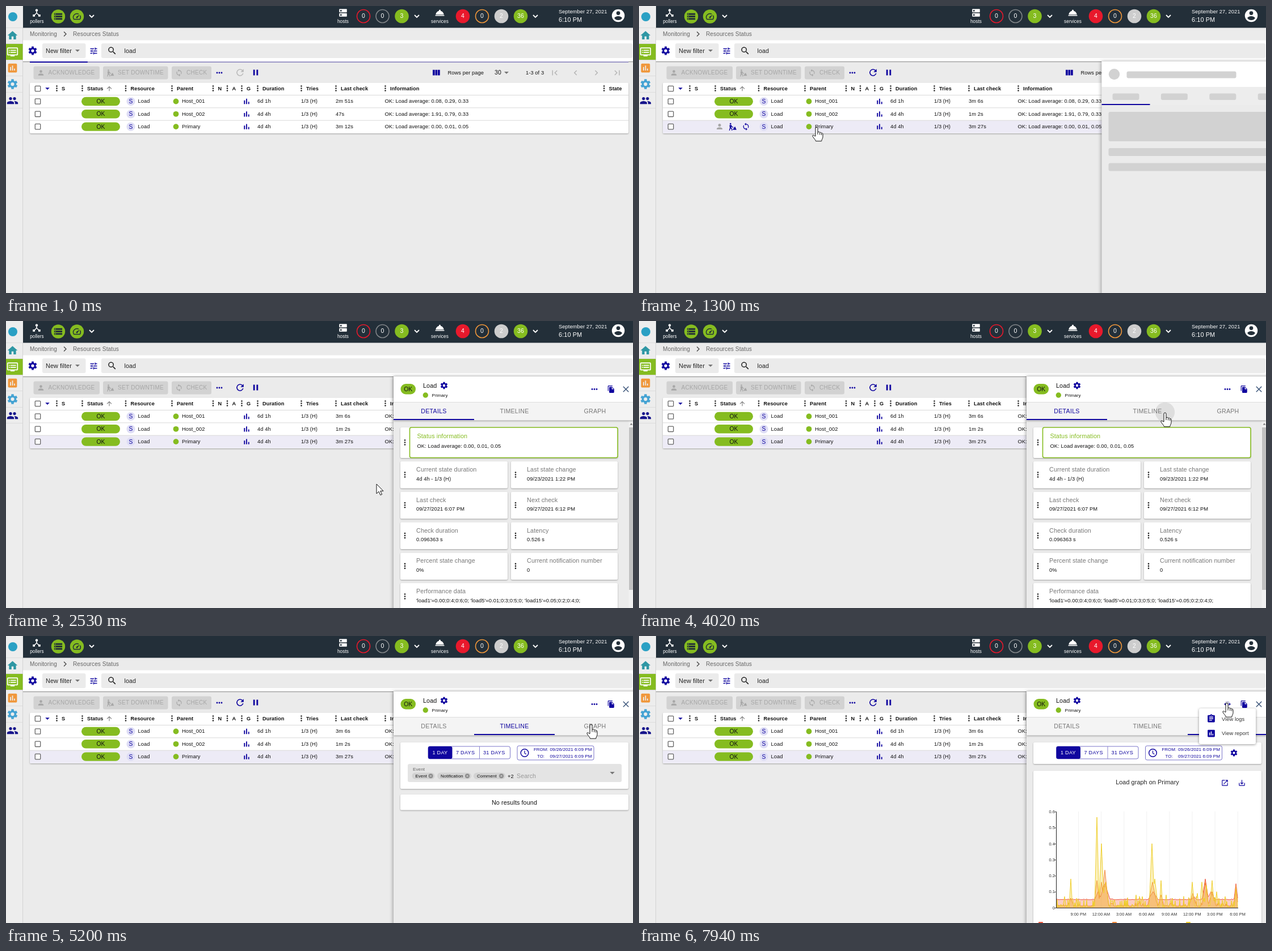
Write an HTML page that moves like this. It is 1105 by 507 pixels and loops after 8 s.

```html
<!DOCTYPE html>
<html lang="en">
<head>
<meta charset="utf-8">
<title>Resources Status</title>
<style>
html, body { margin: 0; width: 100%; height: 100%; overflow: hidden; background: #ebebeb; }
svg { display: block; width: 1105px; height: 507px; font-family: "Liberation Sans", Arial, sans-serif; }
text { letter-spacing: .008em; white-space: pre; }
.caps { letter-spacing: .028em; }
.card { fill: #fff; filter: drop-shadow(0 1px 1px rgba(0,0,0,.32)); }
</style>
</head>
<body>
<svg id="stage" viewBox="0 0 1105 507"></svg>
<script>
const NAVY = '#10069f', GREEN = '#85bc20', RED = '#e8192c', ORANGE = '#f0973b', DARK = '#232f39';
const PAGE = '#ebebeb', MUTED = '#a7a7a7', BONE = '#d2d2d2';
const HOST = 'Primary';

const ICONS = {
  hub: 'M17 16l-4-4V8.82C14.16 8.4 15 7.3 15 6c0-1.66-1.34-3-3-3S9 4.34 9 6c0 1.3.84 2.4 2 2.82V12l-4 4H3v5h5v-3.05l4-4.2 4 4.2V21h5v-5z',
  storage: 'M2 20h20v-4H2zm2-3h2v2H4zM2 4v4h20V4zm4 3H4V5h2zm-4 7h20v-4H2zm2-3h2v2H4z',
  speed: 'M20.38 8.57l-1.23 1.85a8 8 0 0 1-.22 7.58H5.07A8 8 0 0 1 15.58 6.85l1.85-1.23A10 10 0 0 0 3.35 19a2 2 0 0 0 1.72 1h13.85a2 2 0 0 0 1.74-1 10 10 0 0 0-.27-10.44zm-9.79 6.84a2 2 0 0 0 2.83 0l5.66-8.49-8.49 5.66a2 2 0 0 0 0 2.83z',
  dns: 'M4 13h16a1 1 0 0 1 1 1v6a1 1 0 0 1-1 1H4a1 1 0 0 1-1-1v-6a1 1 0 0 1 1-1zm3 2a2 2 0 0 0 0 4 2 2 0 0 0 0-4zM4 3h16a1 1 0 0 1 1 1v6a1 1 0 0 1-1 1H4a1 1 0 0 1-1-1V4a1 1 0 0 1 1-1zm3 2a2 2 0 0 0 0 4 2 2 0 0 0 0-4z',
  bell: 'M2 17h20v2H2zm11.84-9.21a2 2 0 1 0-3.68 0C6.25 8.6 3.27 11.93 3 16h18c-.27-4.07-3.25-7.4-7.16-8.21z',
  account: 'M12 2a10 10 0 0 0 0 20 10 10 0 0 0 0-20zm0 3a3 3 0 0 1 0 6 3 3 0 0 1 0-6zm0 14.2c-2.5 0-4.71-1.28-6-3.22.03-1.99 4-3.08 6-3.08s5.97 1.09 6 3.08c-1.29 1.94-3.5 3.22-6 3.22z',
  home: 'M10 20v-6h4v6h5v-8h3L12 3 2 12h3v8z',
  dvr: 'M21 3H3a2 2 0 0 0-2 2v12a2 2 0 0 0 2 2h5v2h8v-2h5a2 2 0 0 0 2-2V5a2 2 0 0 0-2-2zm0 14H3V5h18zM19 8H8v2h11zm0 4H8v2h11zM7 8H5v2h2zm0 4H5v2h2z',
  report: 'M19 3H5a2 2 0 0 0-2 2v14a2 2 0 0 0 2 2h14a2 2 0 0 0 2-2V5a2 2 0 0 0-2-2zM9 17H7v-7h2zm4 0h-2V7h2zm4 0h-2v-4h2z',
  people: 'M16 11a3 3 0 1 0 0-6 3 3 0 0 0 0 6zm-8 0a3 3 0 1 0 0-6 3 3 0 0 0 0 6zm0 2c-2.33 0-7 1.17-7 3.5V19h14v-2.5C15 14.17 10.33 13 8 13zm8 0l-.97.05c1.16.84 1.97 1.97 1.97 3.45V19h6v-2.5c0-2.33-4.67-3.5-7-3.5z',
  tune: 'M3 17v2h6v-2zM3 5v2h10V5zm10 16v-2h8v-2h-8v-2h-2v6zM7 9v2H3v2h4v2h2V9zm14 4v-2H11v2zm-6-4h2V7h4V5h-4V3h-2z',
  search: 'M15.5 14h-.8l-.27-.27A6.5 6.5 0 1 0 13.73 14.43l.27.28v.79l5 5L20.5 19zm-6 0a4.5 4.5 0 1 1 0-9 4.5 4.5 0 0 1 0 9z',
  person: 'M12 12a4 4 0 1 0 0-8 4 4 0 0 0 0 8zm0 2c-2.67 0-8 1.34-8 4v2h16v-2c0-2.66-5.33-4-8-4z',
  worker: 'M6 2a2 2 0 0 1 0 4.4A2 2 0 0 1 6 2zM3 8l5-1 3 5 3 1v2l-4-1-2-2v3l3 3v5H9v-4l-3-2-2 6H2l2-8zM12 21l4.500-7L19 12l4 9z',
  sync: 'M12 4V1L8 5l4 4V6a6 6 0 0 1 5.3 8.8l1.46 1.46A8 8 0 0 0 12 4zm0 14a6 6 0 0 1-5.3-8.8L5.24 7.74A8 8 0 0 0 12 20v3l4-4-4-4z',
  refresh: 'M17.65 6.35A8 8 0 1 0 19.73 14h-2.08A6 6 0 1 1 16.22 7.78L13 11h7V4z',
  pause: 'M6 19h4V5H6zm8-14v14h4V5z',
  columns: 'M10 18h5V5h-5zm-6 0h5V5H4zM16 5v13h5V5z',
  first: 'M18.4 16.6L13.8 12l4.600-4.600L17 6l-6 6 6 6zM6 6h2v12H6z',
  left: 'M15.400 7.400L14 6l-6 6 6 6 1.400-1.400L10.800 12z',
  right: 'M8.600 7.400L10 6l6 6-6 6-1.400-1.400L13.200 12z',
  last: 'M5.600 7.400L10.200 12l-4.600 4.600L7 18l6-6-6-6zM16 6h2v12h-2z',
  bars: 'M5 9.2h3V19H5zM10.600 5h2.800v14h-2.800zm5.600 8H19v6h-2.800z',
  up: 'M4 12l1.400 1.400L11 7.800V20h2V7.800l5.600 5.600L20 12l-8-8z',
  drop: 'M6 9l6 6 6-6z',
  close: 'M19 6.400L17.600 5 12 10.600 6.400 5 5 6.400l5.600 5.600L5 17.600 6.400 19l5.600-5.600 5.600 5.600 1.400-1.400-5.600-5.600z',
  copy: 'M16 1H4a2 2 0 0 0-2 2v14h2V3h12zm-1 4l6 6v10a2 2 0 0 1-2 2H8a2 2 0 0 1-2-2V7a2 2 0 0 1 2-2zm-1 7h5.500L14 6.500z',
  open: 'M19 19H5V5h7V3H5a2 2 0 0 0-2 2v14a2 2 0 0 0 2 2h14a2 2 0 0 0 2-2v-7h-2zM14 3v2h3.600l-9.800 9.800 1.400 1.400L19 6.400V10h2V3z',
  save: 'M19 12v7H5v-7H3v7a2 2 0 0 0 2 2h14a2 2 0 0 0 2-2v-7zm-6 .7l2.600-2.600L17 11.500l-5 5-5-5 1.400-1.400 2.600 2.600V3h2z',
  logs: 'M19 3h-4.200a3 3 0 0 0-5.600 0H5a2 2 0 0 0-2 2v14a2 2 0 0 0 2 2h14a2 2 0 0 0 2-2V5a2 2 0 0 0-2-2zm-7 0a1 1 0 0 1 0 2 1 1 0 0 1 0-2zm2 14H7v-2h7zm3-4H7v-2h10zm0-4H7V7h10z'
};

const text = (x, y, s, size = 9.3, fill = '#111', extra = '') =>
  `<text x="${x}" y="${y}" font-size="${size}" fill="${fill}" ${extra}>${s}</text>`;
const middle = (x, y, s, size, fill, extra = '') => text(x, y, s, size, fill, 'text-anchor="middle" ' + extra);
const rect = (x, y, w, h, fill, r = 0, extra = '') =>
  `<rect x="${x}" y="${y}" width="${w}" height="${h}" fill="${fill}" rx="${r}" ${extra}/>`;
const card = (x, y, w, h) => rect(x, y, w, h, '#fff', 2, 'class="card"');
const circle = (x, y, r, fill, extra = '') => `<circle cx="${x}" cy="${y}" r="${r}" fill="${fill}" ${extra}/>`;
const path = (d, extra) => `<path d="${d}" ${extra}/>`;
const group = (id, ...parts) => `<g id="${id}">${parts.join('')}</g>`;
const icon = (name, x, y, size, fill, extra = '') =>
  path(ICONS[name], `transform="translate(${x - size / 2} ${y - size / 2}) scale(${size / 24})" fill="${fill}" fill-rule="evenodd" ${extra}`);
const gear = (x, y, r, color) => {
  const teeth = [0, 60, 120].map(a => path('M0-10V-5M0 5V10', `stroke-width="5" transform="rotate(${a})"`)).join('');
  return `<g transform="translate(${x} ${y}) scale(${r / 10})" stroke="${color}" fill="none"><circle r="5.500" stroke-width="4"/>${teeth}</g>`;
};
const chevron = (x, y) => path(`M${x - 4} ${y - 2}l4 4 4-4`, 'fill="none" stroke="#fff" stroke-width="1.800"');
const grip = (x, y) => [-4, 0, 4].map(d => circle(x, y + d, 1.3, '#222')).join('');
const more = (x, y, color) => [-4, 0, 4].map(d => circle(x + d, y, 1.4, color)).join('');
const box = (x, y) => rect(x - 4.7, y - 4.7, 9.4, 9.4, '#fff', 1, 'stroke="#666" stroke-width="1.300"');

function topBar() {
  const badge = (x, s, color, filled) => circle(x, 18, filled ? 12.3 : 11.5, filled ? color : 'none',
    `stroke="${color}" stroke-width="${filled ? 0 : 1.600}"`) + middle(x, 21, s, 10.5, '#fff');
  return rect(30, 0, 1075, 38.5, DARK) +
    icon('hub', 54, 12, 18, '#fff') + middle(54.5, 30, 'pollers', 8.2, '#fff') +
    [92, 125].map((x, i) => circle(x, 18.5, 12.2, GREEN) + icon(['storage', 'speed'][i], x, 18.5, 17, DARK)).join('') +
    icon('dns', 594, 12, 18, '#fff') + middle(594, 30, 'hosts', 8.3, '#fff') +
    badge(630, 0, RED) + badge(663.5, 0, '#818589') + badge(697.5, 3, GREEN, true) +
    icon('bell', 764.5, 12, 19, '#fff') + middle(764.5, 30, 'services', 8.3, '#fff') +
    badge(805, 4, RED, true) + badge(839, 0, ORANGE) + badge(873, 2, '#cdcdcd', true) + badge(907, 36, GREEN, true) +
    [151, 724, 933].map(x => chevron(x, 18)).join('') +
    text(974, 13, 'September 27, 2021', 9.3, '#fff') + text(974, 28, '6:10 PM', 10.9, '#fff') +
    icon('account', 1079, 17, 27, '#fff');
}

function sideBar() {
  return rect(0, 0, 30, 507, '#ededed') + rect(29, 38, 1, 469, '#d3d3d3') +
    [38, 66, 95, 123, 152, 180].map(y => rect(0, y, 29, 1, '#dcdcdc')).join('') +
    circle(12, 19, 8, '#2aa0c4') + rect(0, 67, 29.5, 28, GREEN) +
    icon('home', 11.5, 52, 21, '#2e97a4') + icon('dvr', 11.5, 81, 21, '#fff') +
    icon('report', 11.5, 109.5, 21, ORANGE) + gear(11.5, 138, 8.8, '#45a3d3') + icon('people', 11.5, 167, 21, '#16148c');
}

function filters() {
  const button = (x, w, name, label) => rect(x, 106.5, w, 23, BONE, 3) + icon(name, x + 13, 118, 14, MUTED) +
    text(x + 26, 121.3, label, 10, MUTED, 'class="caps"');
  return text(42, 53, 'Monitoring', 10.1, '#666') + path('M102 45.500l4 4-4 4', 'fill="none" stroke="#444" stroke-width="1.300"') +
    text(118, 53, 'Resources Status', 10.1, '#666') +
    rect(30, 60.5, 1075, 38, '#fff') + rect(30, 98, 1075, 1, '#868686') +
    gear(47, 79, 7.5, NAVY) + rect(64, 66, 76.5, 26, PAGE, 3) + text(70, 82.5, 'New filter', 10.8, '#222') +
    icon('drop', 126, 79, 16, '#777') + icon('tune', 154.5, 79.5, 16, NAVY) +
    rect(168, 66, 936, 26, PAGE, 3) + icon('search', 187, 79, 18, '#222') + text(208.5, 82.5, 'load', 10.7, '#222') +
    button(48.5, 116.5, 'person', 'ACKNOWLEDGE') + button(171, 114.5, 'worker', 'SET DOWNTIME') + button(292, 70, 'sync', 'CHECK') +
    more(376, 118, NAVY) + icon('refresh', 412.5, 117.5, 19, '#bbb', 'id="refresh"') + icon('pause', 440, 117.5, 17, NAVY) +
    icon('columns', 758, 118, 18, NAVY) + text(778.5, 120.5, 'Rows per page') + text(861, 121.3, '30', 10.5) +
    icon('drop', 882, 118, 16, '#777') + text(916, 120.5, '1-3 of 3') +
    ['first', 'left', 'right', 'last'].map((n, i) => icon(n, 967 + i * 36.7, 118, 18, '#b5b5b5')).join('');
}

function table() {
  const heads = { S: 98, Status: 143, Resource: 219.5, Parent: 301, N: 373.5, A: 398.5, G: 424, Duration: 452,
    Tries: 529, 'Last check': 590, Information: 677, State: 1062.5 };
  const rows = [['Host_001', '6d 1h', '0.08, 0.29, 0.33'], ['Host_002', '4d 4h', '1.91, 0.79, 0.33'], [HOST, '4d 4h', '0.00, 0.01, 0.05']];
  const header = box(56, 146) + icon('drop', 73, 146, 15, NAVY) + icon('up', 182, 146, 13, '#777') +
    Object.entries(heads).map(([s, x]) => grip(x - 8.5, 145.5) + text(x, 148.7, s, 9.2, '#111', 'font-weight="700"')).join('');
  const body = rows.map(([name, age, load], i) => {
    const y = 168.5 + i * 22.3, base = y + 2.8;
    const pill = rect(133, y - 7.7, 68, 15.4, GREEN, 7.7) + middle(167, y + 3.6, 'OK', 10.3, '#111');
    return (i == 2 ? rect(42, y - 11, 1055, 22.5, '#edebf6', 0, 'id="selected"') : '') +
      rect(42, y - 11.5, 1055, 1, '#d9d9d9') + box(56, y) + group('pill' + i, pill) +
      circle(220, y, 7.6, '#dfdef5') + middle(220, y + 3.6, 'S', 10.3, NAVY) + text(232.5, base, 'Load') +
      circle(299.5, y, 4.9, GREEN) + text(310, base, name) + icon('bars', 424, y, 16, NAVY) + text(443, base, age) +
      text(520, base, '1/3 (H)') + text(581, base, '', 9.3, '#111', `id="check${i}"`) + text(667.5, base, 'OK: Load average: ' + load);
  }).join('');
  return card(42, 135.5, 1055, 89.5) + header + body +
    group('rowTools', icon('person', 142, 213, 15, MUTED), icon('worker', 165, 213, 15, NAVY), icon('sync', 188.5, 213, 15, NAVY));
}

function skeleton() {
  const bone = (x, y, w, h) => rect(x, y, w, h, BONE, 3);
  return group('skeleton', rect(683, 98, 422, 45, '#fff'), circle(705, 120.5, 9.7, BONE), bone(727, 115.5, 193, 12),
    rect(683, 143.5, 422, 31.5, '#ededed'), [0, 1, 2, 3, 4].map(i => bone(702 + i * 85.4, 154.5, 47, 11.5)).join(''),
    rect(683, 173, 85, 2, NAVY), bone(695, 187, 402, 52), bone(695, 251, 402, 14), bone(695, 277.5, 402, 14));
}

function details() {
  const tile = (x, y, w, title, value) => card(x, y, w, 47.5) + grip(x + 8, y + 23.5) +
    text(x + 28, y + 18, title, 10.8, '#777') + text(x + 28, y + 33.5, value);
  const pairs = [['Current state duration', '4d 4h - 1/3 (H)', 'Last state change', '09/23/2021 1:22 PM'],
    ['Last check', '09/27/2021 6:07 PM', 'Next check', '09/27/2021 6:12 PM'],
    ['Check duration', '0.096363 s', 'Latency', '0.526 s'], ['Percent state change', '0%', 'Current notification number', '0']];
  return group('details', card(695, 188, 383, 54), grip(703, 214.5),
    rect(711.5, 188, 366.5, 53.5, '#fff', 3, `stroke="${GREEN}" stroke-width="1.600"`),
    text(724.5, 206.5, 'Status information', 10.8, GREEN), text(724.5, 224, 'OK: Load average: 0.00, 0.01, 0.05'),
    pairs.map(([a, b, c, d], i) => tile(695, 248 + i * 53.8, 189, a, b) + tile(890, 248 + i * 53.8, 188, c, d)).join(''),
    tile(695, 463, 383, 'Performance data', "'load1'=0.00;0:4;0:6;0; 'load5'=0.01;0:3;0:5;0; 'load15'=0.05;0:2;0:4;0;"),
    rect(1097.5, 176, 7.5, 331, '#f1f1f1'), rect(1098, 188, 7, 287, '#c1c1c1'), path('M1099.500 183.500l2.500-3 2.500 3z', 'fill="#777"'));
}

function period(dx) {
  const label = (x, s, fill) => text(x + dx, 209, s, 9.1, fill, 'class="caps"');
  return rect(744 + dx, 195, 144.5, 22, '#fff', 3, `stroke="${NAVY}" stroke-opacity=".55"`) + rect(744 + dx, 195, 42.5, 22, NAVY, 3) +
    rect(834 + dx, 195, 1, 22, '#8d88cf') + label(751.5, '1 DAY', '#fff') + label(793, '7 DAYS', NAVY) + label(841, '31 DAYS', NAVY) +
    rect(901 + dx, 194, 135, 25, '#fff', 3, `stroke="${NAVY}" stroke-opacity=".55"`) +
    circle(914 + dx, 206.5, 6.8, 'none', 'stroke="#10069f" stroke-width="1.500"') +
    path(`M${914 + dx} 202.500v4.500l3 2`, 'fill="none" stroke="#10069f" stroke-width="1.200"') +
    text(930 + dx, 203, 'FROM:', 7.8, NAVY) + text(958.5 + dx, 203, '09/26/2021 6:09 PM', 8.1, NAVY) +
    text(936 + dx, 215, 'TO:', 7.8, NAVY) + text(958.5 + dx, 215, '09/27/2021 6:09 PM', 8.1, NAVY);
}

function timeline() {
  const chip = (x, w, s) => rect(x, 241.5, w, 11.5, '#d2d2d2', 5.7) + text(x + 6, 250, s, 7.9) +
    circle(x + w - 7, 247.3, 4, '#8c8c8c') + path(`M${x + w - 8.5} 245.800l3 3m0-3l-3 3`, 'stroke="#ddd"');
  return group('timeline', card(695, 188, 402, 82), period(0), rect(708, 226, 377, 32, '#e4e4e4', 3),
    text(717, 238, 'Event', 8.1, '#666'), chip(715.5, 40, 'Event'), chip(760, 60, 'Notification'), chip(824, 56, 'Comment'),
    text(884, 250.5, '+2', 9.4), text(900, 251, 'Search', 10.6, '#999'), icon('drop', 1068.5, 242, 17, '#777'),
    group('noResults', card(695, 280, 402, 27.5), middle(896, 297.5, 'No results found', 10.8, '#111')),
    group('waiting', [280, 341, 402].map(y => rect(695, y, 402, 55, BONE, 3)).join('')));
}

// Each series is a floor with triangular peaks: [x, value, half width].
function series(floor, peaks, ripple, color) {
  let seed = 7, d = 'M736 480';
  const random = () => (seed = seed * 16807 % 2147483647) / 2147483647;
  for (let x = 736; x <= 1055; x++) {
    const noise = ripple * Math.pow(random(), 5);
    const v = Math.max(floor + noise, ...peaks.map(([px, h, w]) => h * (1 - Math.abs(x - px) / w)));
    d += `L${x} ${(480 - v * 283).toFixed(1)}`;
  }
  return path(d + 'V480z', `fill="${color}" fill-opacity=".3"`) + path(d, `fill="none" stroke="${color}" stroke-width="1"`);
}

function graph() {
  const hours = ['9:00 PM', '12:00 AM', '3:00 AM', '6:00 AM', '9:00 AM', '12:00 PM', '3:00 PM', '6:00 PM'];
  const red = [[809, .1, 12], [821, .15, 14], [906, .1, 18], [978, .07, 16], [998, .18, 8], [1008, .1, 14], [1052, .15, 5]];
  const orange = [[761, .06, 6], [807, .17, 6], [815, .16, 6], [821, .235, 7], [905, .16, 9], [920, .08, 6], [976, .09, 7],
    [998, .16, 6], [1010, .1, 8], [1052, .14, 4]];
  const yellow = [[750, .07, 3], [761, .18, 3], [771, .06, 2], [807, .565, 4], [815, .4, 5], [822, .16, 7], [838, .05, 3],
    [876, .08, 3], [887, .07, 4], [904, .4, 5], [909, .18, 6], [920, .17, 3], [929, .08, 3], [975, .16, 4], [984, .09, 3],
    [992, .16, 4], [1000, .14, 4], [1010, .17, 4], [1018, .1, 3], [1033, .07, 3], [1052, .12, 3]];
  return group('graph', card(695, 188, 402, 38), period(-8.5), gear(1048.5, 206.5, 6, NAVY), card(695, 238, 402, 280),
    group('chart', middle(896, 262, 'Load graph on ' + HOST, 10.8, '#222'), icon('open', 1032.5, 259.5, 14, NAVY), icon('save', 1062.5, 259.5, 14, NAVY),
      hours.map((s, i) => rect(774 + i * 40.1, 310, 1, 170, '#f1f1f1') + middle(774.3 + i * 40.1, 494, s, 7.3, '#333')).join(''),
      series(.05, red, .008, '#ee5a42'), series(.01, orange, .03, '#f3893a'), series(.003, yellow, .07, '#f0d02e'),
      path('M735.500 310V480.500H1056', 'fill="none" stroke="#222"'),
      [0, 1, 2, 3, 4, 5, 6].map(i => rect(732, 480 - i * 28.3, 4, 1, '#555') +
        text(733, 482.7 - i * 28.3, i ? '0.' + i : '0', 7.5, '#333', 'text-anchor="end"')).join(''),
      ['#ee5a42', '#f3893a', '#f0d02e'].map((c, i) => rect(704 + i * 130, 505, 8, 4, c, 1)).join('')));
}

function panel() {
  const tab = (i, s) => middle(754 + i * 142, 163.3, s, 10.6, '#777', `id="tab${i}" class="caps"`);
  const loaded = group('loaded', details(), timeline(), graph(),
    rect(683, 98, 422, 77.5, '#f4f4f4', 0, 'style="filter:drop-shadow(0 1px 1.500px rgba(0,0,0,.35))"'),
    rect(683, 98, 422, 45, '#fff'), rect(683, 143, 422, 1, '#dedede'),
    rect(695.5, 111, 26.5, 18.5, GREEN, 9), middle(708.7, 124, 'OK', 10.3, '#111'),
    text(735, 118, 'Load', 10.8), gear(772, 114, 6.3, NAVY), circle(739.3, 131, 4.7, GREEN), text(750.5, 133.7, HOST, 8),
    circle(1037, 120, 5, '#c9c8dc', 'id="dotRipple"'), more(1037, 120.5, NAVY), icon('copy', 1066.5, 120.5, 14, NAVY), icon('close', 1092.5, 120.5, 18, '#3f587c'),
    '<g clip-path="url(#tabClip)">' + circle(0, 0, 0, '#000', 'id="ripple"') + '</g>',
    tab(0, 'DETAILS'), tab(1, 'TIMELINE'), tab(2, 'GRAPH'), rect(683, 173, 142, 2, NAVY, 0, 'id="indicator"'));
  return group('panel', rect(683, 98, 430, 420, PAGE, 0, 'style="filter:drop-shadow(-1px 0 3px rgba(0,0,0,.35))"'), skeleton(), loaded);
}

const menu = group('menu', rect(987, 128, 100, 63, '#fff', 3, 'style="filter:drop-shadow(0 1px 2px rgba(0,0,0,.4))"'),
  icon('logs', 1008.5, 146, 17, NAVY), text(1027, 149.7, 'View logs', 9.3, '#333'),
  icon('report', 1008.5, 172, 17, NAVY), text(1027, 175, 'View report', 9.3, '#333'));
const tooltip = group('tooltip', rect(1015, 134, 45, 18.5, '#616161', 3, 'fill-opacity=".92"'), middle(1037.5, 146, 'Actions', 8, '#fff'));
const cursor = group('cursor',
  path('M0 0V17l4-3.800 2.800 6.300 2.800-1.200-2.800-6H12z', 'id="arrow" fill="#fff" stroke="#111"'),
  path('M-2 2a2 2 0 0 1 4 0v7c1-1.200 3.400-.9 3.700.6 1-.8 2.800-.3 3 1 1.200-.5 2.300.3 2.300 1.600v5c0 3-2 4-2.300 7.500H-1.500c-.3-3-5.500-6.500-5.700-9.500.3-1.600 2.300-1.200 3.400.2L-2 16zM2 9v4M5.700 10v3.500M8.700 11v3',
    'id="hand" fill="#fff" stroke="#111"'),
  path('M-13 0l6-6v4H7v-4l6 6-6 6V2H-7v4z', 'id="resize" fill="#111" stroke="#fff"'));

document.getElementById('stage').innerHTML =
  '<clipPath id="tabClip"><rect id="tabArea" y="144" width="142" height="31"/></clipPath>' +
  rect(0, 0, 1105, 507, PAGE) + filters() +
  group('progress', rect(42, 98, 1055, 2, '#9d98c8'), rect(42, 98, 0, 2, NAVY, 0, 'id="progressBar"')) +
  table() + topBar() + sideBar() + panel() + tooltip + menu + cursor;

const $ = id => document.getElementById(id);
const set = (id, values) => Object.entries(values).forEach(([k, v]) => $(id).setAttribute(k, v));
const show = (id, on) => $(id).style.display = on ? '' : 'none';
const ramp = (t, from, to) => Math.min(1, Math.max(0, (t - from) / (to - from)));
const smooth = p => p * p * (3 - 2 * p);

const TRACK = [[70, 945, 477], [820, 312, 213], [890, 313, 214], [1900, 313, 214], [2530, 653, 288], [2670, 685, 290],
  [3280, 1067, 170], [3430, 1067, 170], [3930, 927, 162], [4500, 927, 162], [5060, 1022, 158], [5200, 1031, 156.500],
  [5800, 1031, 156.500], [6170, 1023, 144], [6450, 1019, 131], [6720, 1031, 120.500], [6860, 1036, 118.500]];

function pointer(t) {
  const i = TRACK.findIndex(k => k[0] > t);
  if (i < 1) return (i ? TRACK[TRACK.length - 1] : TRACK[0]).slice(1);
  const [t0, x0, y0] = TRACK[i - 1], [t1, x1, y1] = TRACK[i], p = smooth(ramp(t, t0, t1));
  return [x0 + (x1 - x0) * p, y0 + (y1 - y0) * p];
}

function drawRipple(t) {
  const second = t > 5600, start = second ? 5670 : 3960, fade = second ? 6000 : 4150;
  set('tabArea', { x: second ? 967 : 825 });
  set('ripple', { cx: second ? 1031 : 927, cy: second ? 157 : 161, r: t < start ? 0 : 6 + 110 * ramp(t, start, start + 600),
    opacity: .09 * (1 - ramp(t, fade, fade + 450)) });
}

function render(t) {
  const loading = t < 280, p = .05 + t / 1260;
  show('progress', loading);
  const left = Math.max(0, -.35 + 1.35 * p), right = Math.min(1, 1.9 * p);
  set('progressBar', { x: 42 + 1055 * left, width: 1055 * Math.max(0, right - left) });
  set('refresh', { fill: loading ? '#bbb' : NAVY });
  (loading ? ['2m 51s', '47s', '3m 12s'] : ['3m 6s', '1m 2s', '3m 27s']).forEach((s, i) => $('check' + i).textContent = s);

  const [x, y] = pointer(t);
  const hovering = t > 700 && t < 2200 && y > 202 && y < 226;
  show('rowTools', hovering);
  show('pill2', !hovering);
  show('selected', hovering || t > 1100);

  const slide = 1 - Math.pow(1 - ramp(t, 1227, 1455), 3);
  show('panel', t >= 1227);
  set('panel', { transform: `translate(${430 - 430 * slide} 0)` });
  show('skeleton', t < 1720);
  show('loaded', t >= 1720);

  const page = t < 4090 ? 0 : t < 5740 ? 1 : 2;
  ['details', 'timeline', 'graph'].forEach((id, i) => {
    show(id, i == page);
    set('tab' + i, { fill: i == page ? NAVY : '#777' });
  });
  show('waiting', t < 4560);
  show('noResults', t >= 4560);
  show('chart', t >= 5960);
  set('indicator', { x: 683 + 142 * (smooth(ramp(t, 4050, 4330)) + smooth(ramp(t, 5720, 6000))), width: page == 2 ? 138 : 142 });
  drawRipple(t);

  show('tooltip', t > 6840 && t < 7740);
  set('tooltip', { opacity: ramp(t, 6840, 6990) });
  show('menu', t > 7720);
  set('menu', { opacity: ramp(t, 7720, 7900) });
  show('dotRipple', t > 7720);

  const resizing = t >= 2640 && t < 2730;
  const hand = !resizing && ((t >= 885 && t < 1960) || (t > 2740 && y < 175 && (y > 143 || t > 6600)));
  show('cursor', t >= 70);
  show('resize', resizing);
  show('hand', hand);
  show('arrow', !hand && !resizing);
  set('cursor', { transform: `translate(${x} ${y})` });
}

const origin = performance.now();
function tick() {
  render((performance.now() - origin) % 8000);
  requestAnimationFrame(tick);
}
tick();
</script>
</body>
</html>
```
